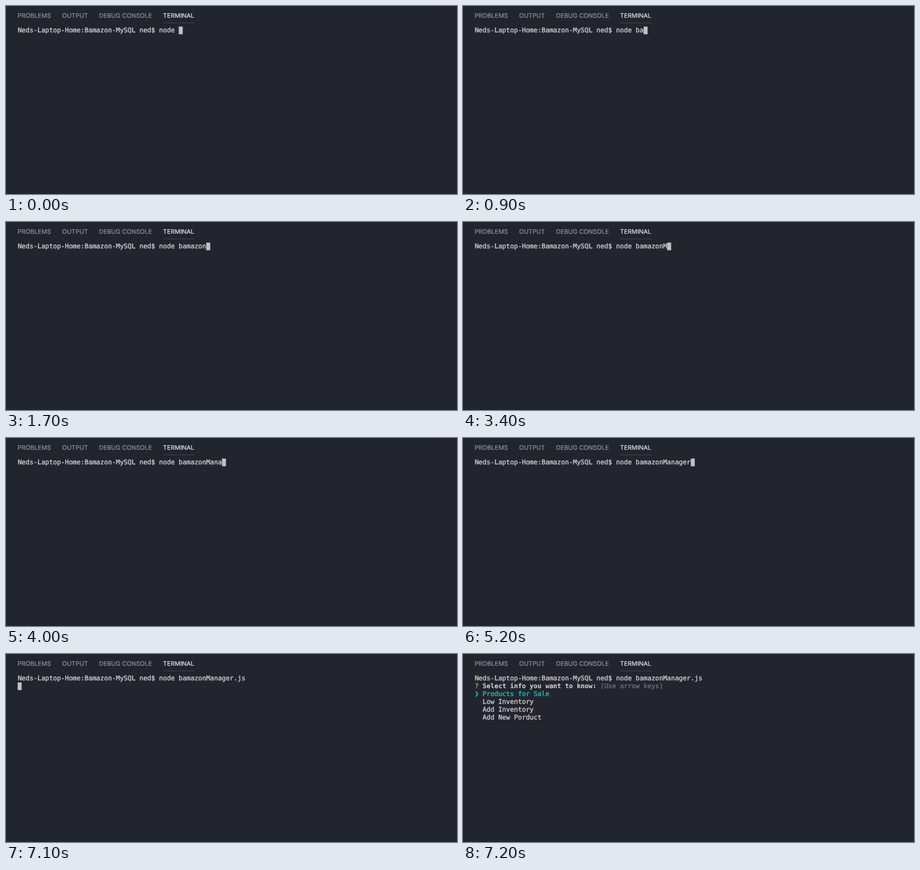
These frames come from a looping animation (800x336 px, 8000 ms). An HTML page:

```html
<!DOCTYPE html>
<html lang="en">
<head>
<meta charset="utf-8">
<title>Terminal</title>
<style>
  html, body { margin: 0; width: 100%; height: 100%; overflow: hidden; background: #22252d; }
  svg { display: block; width: 800px; height: 336px; }
  text { white-space: pre; text-rendering: geometricPrecision; }
  .tabs { font: 10.95px Inter, Roboto, sans-serif; --ink: #94969b; }
  .tabs .active { --ink: #ececee; }
  .terminal { font: 11.577px "DejaVu Sans Mono", monospace; --ink: #d0d1d3; }
  text, tspan { fill: var(--ink); stroke: var(--ink); }
  .tabs text { stroke-width: 0.2px; }
  .terminal text { stroke-width: 0.35px; }
  .terminal .bold { font-weight: bold; stroke-width: 0.1px; }
  .green { --ink: #5fc93c; }
  .cyan { --ink: #25c1c5; }
  .dim { --ink: #707378; }
  .cursor { fill: #c1c2c5; }
</style>
</head>
<body>
<svg viewBox="0 0 800 336">
  <rect width="800" height="336" fill="#22252d"/>
  <rect width="1" height="336" fill="#1d2026"/>
  <g class="tabs">
    <text x="20.6" y="21">PROBLEMS</text>
    <text x="99.6" y="21">OUTPUT</text>
    <text x="165" y="21">DEBUG CONSOLE</text>
    <text x="278.6" y="21" class="active">TERMINAL</text>
  </g>
  <rect x="279" y="29.7" width="54.5" height="1" fill="#42454c"/>
  <g class="terminal">
    <text id="command" x="20.9" y="47"></text>
    <g id="menu" visibility="hidden">
      <text x="20.9" y="61"><tspan class="bold green">?</tspan><tspan class="bold"> Select info you want to know:</tspan><tspan class="dim"> (Use arrow keys)</tspan></text>
      <text x="20.9" y="75" class="cyan">❯ Products for Sale</text>
      <text x="20.9" y="89">  Low Inventory</text>
      <text x="20.9" y="103">  Add Inventory</text>
      <text x="20.9" y="117">  Add New Porduct</text>
    </g>
  </g>
  <rect id="cursor" class="cursor" width="7" height="13.7"/>
</svg>
<script>
  const LOOP = 8000, ENTER = 6600, MENU = 7200;
  const LEFT = 20.7, TOP = 36.8, COLUMN = 6.97, ROW = 14;
  const PROMPT = "Neds-Laptop-Home:Bamazon-MySQL ned$ node ";
  const TYPED = "bamazonManager.js";
  // One time per typed character
  const KEY_TIMES = [100, 900, 1000, 1100, 1300, 1500, 1700, 3400, 3700,
                     3800, 4000, 4200, 5100, 5200, 6000, 6200, 6400];

  const [command, menu, cursor] =
    ["command", "menu", "cursor"].map(id => document.getElementById(id));
  const show = (element, on) => element.setAttribute("visibility", on ? "visible" : "hidden");

  function draw(time) {
    const line = PROMPT + TYPED.slice(0, KEY_TIMES.filter(key => key <= time).length);
    const entered = time >= ENTER;
    if (command.textContent !== line) command.textContent = line;
    cursor.setAttribute("x", LEFT + (entered ? 0 : line.length * COLUMN));
    cursor.setAttribute("y", TOP + (entered ? ROW : 0));
    show(cursor, time < MENU);
    show(menu, time >= MENU);
  }

  const start = performance.now();
  function tick() {
    draw((performance.now() - start) % LOOP);
    requestAnimationFrame(tick);
  }
  tick();
</script>
</body>
</html>
```
